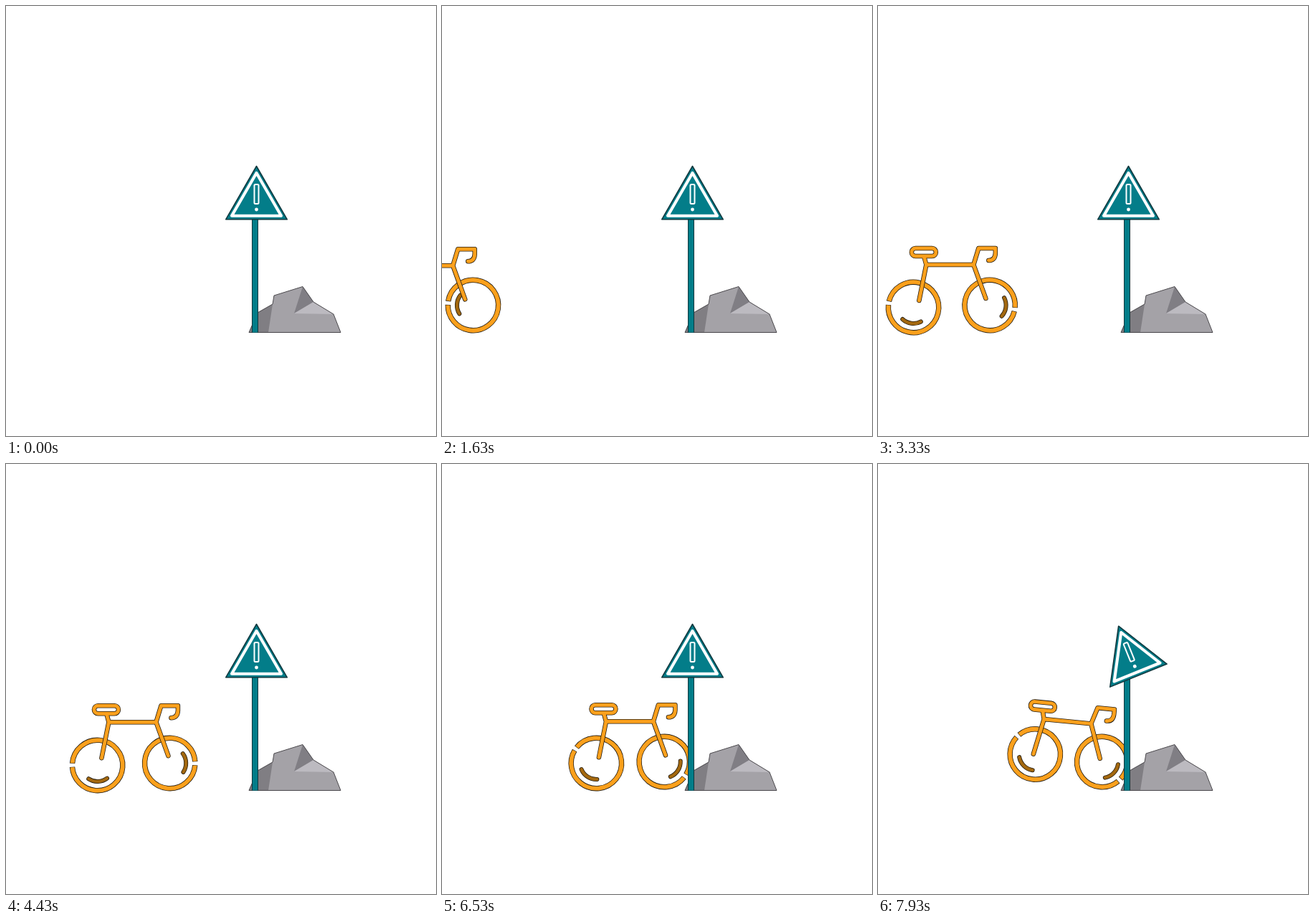
Write an HTML page with a canvas that moves like this. It is 600x600 px and loops after 8 s.

```html
<!DOCTYPE html>
<html lang="en">
<head>
<meta charset="utf-8">
<title>Bicycle and warning sign</title>
<style>
html, body { margin: 0; width: 100%; height: 100%; overflow: hidden; background: #fff; }
canvas { display: block; width: 600px; height: 600px; }
</style>
</head>
<body>
<canvas id="stage" width="600" height="600"></canvas>
<script>
const ctx = document.getElementById('stage').getContext('2d');
const LOOP = 8000, STEP = 100, FIRST = 130;
const ORANGE = '#fba01c', BROWN = '#a3680f', TEAL = '#037d89', EDGE = '#231c12', DARK_TEAL = '#0f383e';
const RAD = Math.PI / 180;

// Ride: steady speed, then even braking until the wheel hits the pole
const SPEED = 0.0695, BRAKE = 4250, HALT = 7220, HALT_X = 334, HIT_X = 331;

function rideX(t) {
  const left = HALT - Math.max(t, BRAKE);
  const braking = SPEED * left * left / (2 * (HALT - BRAKE));
  const cruising = SPEED * Math.max(0, BRAKE - t);
  return left < 0 ? HIT_X : Math.min(HIT_X, HALT_X - braking - cruising);
}

const ramp = (t, a, b) => Math.min(1, Math.max(0, (t - a) / (b - a)));

function path(points, closed) {
  ctx.beginPath();
  points.forEach(([x, y]) => ctx.lineTo(x, y));
  if (closed) ctx.closePath();
}

function fill(points, color) {
  path(points, true);
  ctx.fillStyle = color;
  ctx.fill();
}

function line(color, width) {
  ctx.strokeStyle = color;
  ctx.lineWidth = width;
  ctx.stroke();
}

function rock() {
  const left = [339, 455.5], ledge = [351, 428], step = [372, 416], top = [414, 391.5];
  const notch = [429, 413], corner = [457, 430], dip = [402, 429];
  const outline = [left, ledge, step, [374, 404], top, notch, corner, [467, 455.5]];
  fill(outline, '#a4a2a7');
  fill([left, ledge, step, [366, 455.5]], '#807e83');
  fill([top, dip, notch], '#807e84');
  fill([dip, notch, corner], '#bcbac0');
  path(outline, true);
  line('#4a484c', 1);
}

// Isosceles triangle with its apex and base on the vertical axis
const triangle = (apex, base, half) => [[0, apex], [half, base], [-half, base]];

function arc(radius, from, to) {
  ctx.beginPath();
  ctx.arc(0, 0, radius, from * RAD, to * RAD);
}

function wheel(x, y, turn, shine) {
  ctx.save();
  ctx.translate(x, y);
  ctx.rotate(turn * RAD);
  ctx.lineCap = 'butt';
  arc(35.2, 4, 356);
  line(EDGE, 7.4);
  arc(35.2, 5, 355);
  line(ORANGE, 5.8);
  ctx.lineCap = 'round';
  arc(22.5, shine - 35, shine + 35);
  line(EDGE, 6);
  line(BROWN, 4.4);
  ctx.restore();
}

// Drawn with x = 0 at the handlebar end, tipped about the middle of the top tube
function frame(x, y, tilt) {
  ctx.save();
  ctx.translate(x - 65.5, 361 + y);
  ctx.rotate(5.6 * RAD * tilt);
  ctx.translate(66, -361);
  ctx.lineCap = ctx.lineJoin = 'round';
  path([[-103, 350], [-100, 361], [-110, 411]]);
  ctx.moveTo(-100, 361);
  ctx.lineTo(-34, 361);
  ctx.lineTo(-17, 408);
  ctx.moveTo(-34, 361);
  ctx.lineTo(-27, 338);
  ctx.lineTo(-3.5, 338);
  ctx.lineTo(-3.5, 345);
  ctx.quadraticCurveTo(-4, 355, -13, 355);
  ctx.roundRect(-120.5, 338, 34, 11, 5.5);
  line(EDGE, 6.5);
  line(ORANGE, 4.9);
  ctx.restore();
}

function bike(t, tilt) {
  const x = rideX(t), d = x - 168;
  const lift = ramp(t, 5650, 6330);
  const turn = 15 + 4.61 * d;
  wheel(x - 117.3 + 0.0265 * d + 1.3 * tilt, 420.5 - 3 * lift - 12.5 * tilt, turn + 180, -92);
  wheel(x - 10.8 - 0.046 * d, 417.5 - 2 * lift, turn, -2);
  frame(x, -0.0107 * d, tilt);
}

function pole() {
  ctx.fillStyle = DARK_TEAL;
  ctx.fillRect(343, 297, 9, 158.5);
  ctx.fillStyle = TEAL;
  ctx.fillRect(344, 297, 7, 158.5);
}

function sign(tilt) {
  ctx.save();
  ctx.translate(349.5, 260.5);
  ctx.rotate(-22 * RAD * tilt);
  ctx.lineJoin = 'round';
  fill(triangle(-37, 37.3, 42.8), TEAL);
  line(DARK_TEAL, 1.6);
  path(triangle(-27.5, 32.3, 34.5), true);
  line('#fff', 4.1);
  ctx.beginPath();
  ctx.roundRect(-3, -11.5, 6, 27, 1.5);
  line('#fff', 2);
  ctx.translate(0, 23.5);
  arc(2.4, 0, 360);
  ctx.fillStyle = '#fff';
  ctx.fill();
  ctx.restore();
}

function draw(now) {
  const time = now % LOOP;
  const t = time < FIRST ? 0 : FIRST + Math.floor((time - FIRST) / STEP) * STEP;
  const tilt = ramp(t, 7000, 7930);
  ctx.clearRect(0, 0, 600, 600);
  rock();
  bike(t, tilt);
  pole();
  sign(tilt);
}

const start = performance.now();
function tick() {
  draw(performance.now() - start);
  requestAnimationFrame(tick);
}
tick();
</script>
</body>
</html>
```
